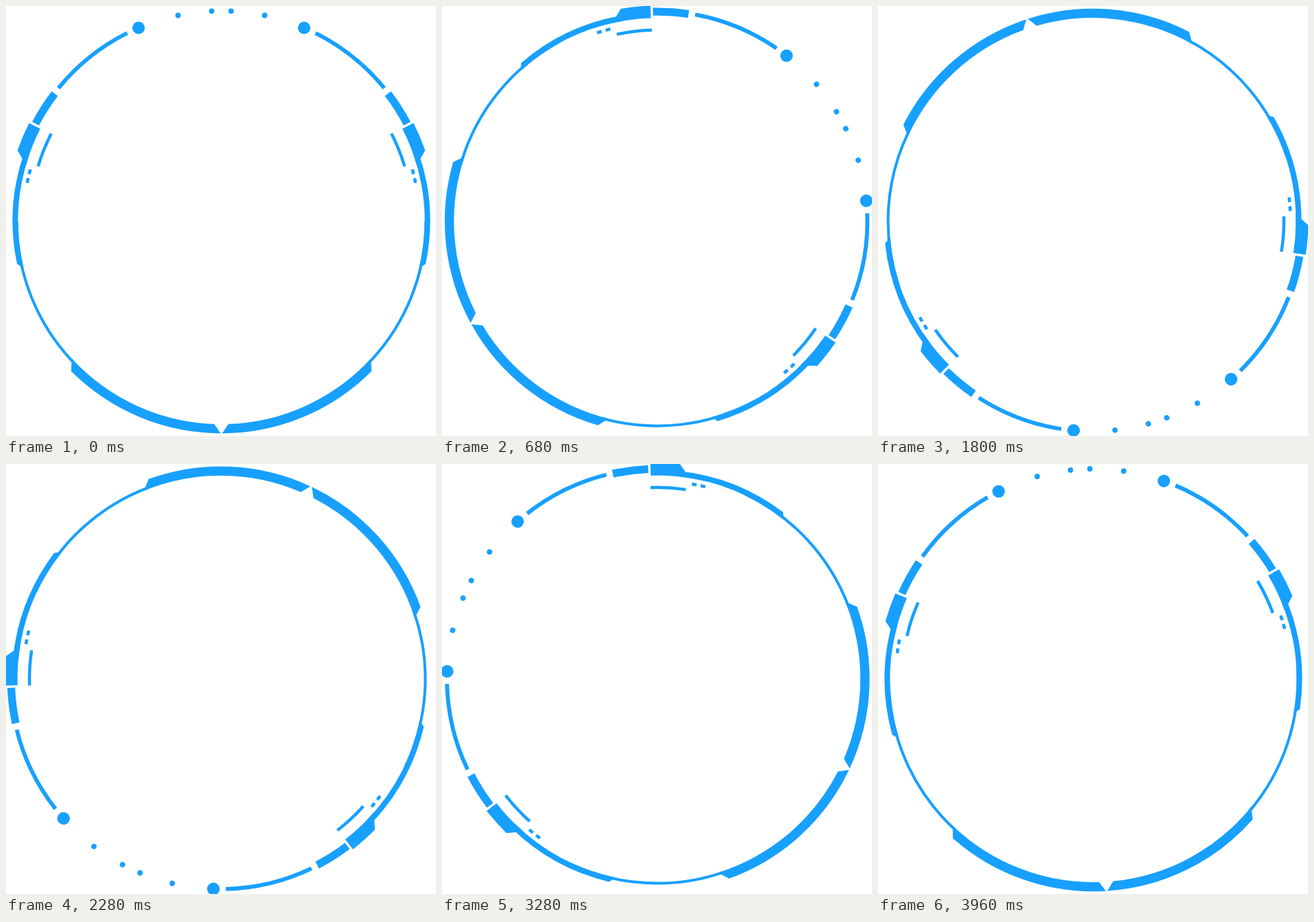
Animation of 620x620 px, one loop 4000 ms. Source, as an HTML page:

```html
<!DOCTYPE html>
<html lang="en">
<head>
<meta charset="utf-8">
<title>Rotating ring</title>
<style>
  html, body { margin: 0; width: 100%; height: 100%; overflow: hidden; background: #fff; }
  svg { display: block; width: 100vw; height: 100vh; }
</style>
</head>
<body>
<svg viewBox="0 0 620 620" fill="#18a0ff">
  <g id="ring">
    <g transform="translate(310.5 310)">
      <g id="half"></g>
      <use href="#half" transform="scale(-1 1)"/>
    </g>
  </g>
</svg>
<script>
const LOOP = 4000, STEP = 40;
const ring = document.getElementById('ring');

// Polar point on the left half: degrees above the horizontal.
function point(radius, degrees) {
  const a = degrees * Math.PI / 180;
  return [-radius * Math.cos(a), -radius * Math.sin(a)];
}

// Ring segment; the inner edge may have its own angles for slanted ends.
function segment(inner, outer, from, to, innerFrom = from, innerTo = to) {
  return `<path d="M${point(outer, from)} A${outer},${outer} 0 0 1 ${point(outer, to)}
    L${point(inner, innerTo)} A${inner},${inner} 0 0 0 ${point(inner, innerFrom)}Z"/>`;
}

function dot(degrees, size) {
  const [x, y] = point(303, degrees);
  return `<circle cx="${x}" cy="${y}" r="${size}"/>`;
}

document.getElementById('half').innerHTML = [
  segment(293, 306.3, -89.8, -45, -88, -42.6),
  segment(293, 297, -44, 0),
  segment(293, 301, -11.9, 19, -13.4, 19),
  segment(293, 311, 19.1, 27, 16, 27),
  segment(296.7, 308, 27.65, 37.4),
  segment(300.2, 306, 39.2, 63.4),
  segment(273.5, 278, 16.6, 27.2),
  segment(283, 287.5, 13.7, 15.1),
  segment(283, 287.5, 11.1, 12.5),
  dot(66.8, 9),
  dot(78.1, 3.9),
  dot(87.35, 3.9)
].join('');

function draw() {
  const frame = Math.floor(performance.now() % LOOP / STEP);
  ring.setAttribute('transform', `rotate(${frame * STEP / LOOP * 360} 310 310)`);
  requestAnimationFrame(draw);
}
draw();
</script>
</body>
</html>
```
